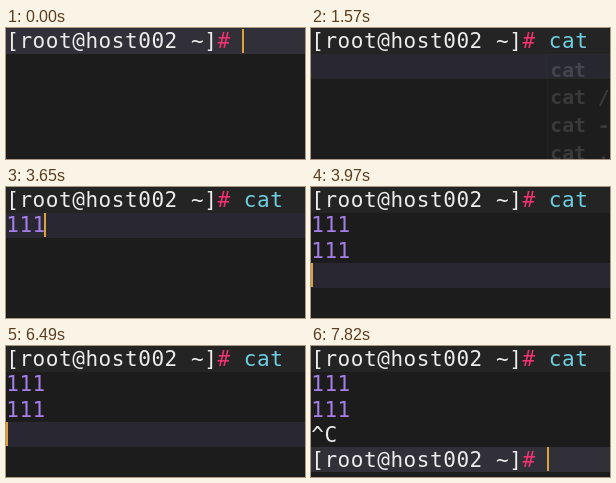
Write an HTML page that moves like this. It is 299 px wide and 131 px high and loops after 8300 ms.

```html
<!DOCTYPE html>
<html lang="en">
<head>
<meta charset="utf-8">
<title>Terminal</title>
<style>
html, body { margin: 0; width: 100%; height: 100%; overflow: hidden; background: #1c1c1c; }
svg { display: block; width: 299px; height: 131px; }
text { font: 21px "DejaVu Sans Mono", monospace; letter-spacing: 0.557px; white-space: pre; fill: #ececec; }
.hash { fill: #f0326e; }
.cmd { fill: #6fcfe2; }
.num { fill: #a57ee8; }
.shade { fill: #fff; fill-opacity: 0.035; }
#popup text { font-size: 19.7px; font-weight: bold; letter-spacing: 0; fill: #b4b4b4; }
</style>
</head>
<body>
<svg viewBox="0 0 299 131" xmlns="http://www.w3.org/2000/svg">
  <rect width="299" height="131" fill="#1c1c1c"/>
  <rect id="active" width="299" fill="#292832"/>
  <rect class="shade" width="299" height="26"/>
  <rect class="shade" id="lastPrompt" y="101" width="299" height="25"/>
  <g id="lines"></g>
  <rect id="cursor" width="2" height="24" fill="#dca23c"/>
  <g id="popup">
    <rect x="236" y="26" width="63" height="105" fill="#242424"/>
    <path d="M299 26.5H236.5V131" fill="none" stroke="#3a3a3c"/>
  </g>
</svg>
<script>
const LOOP = 8300, CHAR = 13.2, ROW = 25;
const $ = id => document.getElementById(id);
const rowTop = r => r ? 1 + r * ROW : 0;
const baseline = r => 20.3 + r * 25.1;

function addText(parent, x, y) {
  const el = document.createElementNS("http://www.w3.org/2000/svg", "text");
  el.setAttribute("x", x);
  el.setAttribute("y", y);
  parent.append(el);
  return el;
}

const lines = [0, 1, 2, 3, 4].map(r => addText($("lines"), 0.2, baseline(r)));
["cat", "cat /", "cat -", "cat ."].forEach((s, i) => {
  addText($("popup"), 239.3, 48.7 + i * 27.6).textContent = s;
});

const prompt = '[root@host002 ~]<tspan class="hash">#</tspan> ';
const span = (cls, s) => `<tspan class="${cls}">${s}</tspan>`;

// Value of the last [time, value] step that has been reached
const step = (t, steps) => steps.reduce((v, [at, next]) => t >= at ? next : v, steps[0][1]);

const command = [[0, ""], [560, "c"], [720, "ca"], [860, "cat"]];
const input = [[0, ""], [3010, "1"], [3170, "11"], [3410, "111"]];
const activeRow = [[0, 0], [1490, 1], [3970, 3], [6800, 4]];
const popupAlpha = [[0, 0], [640, 0.5], [720, 1], [1490, 0.5], [1570, 0.2], [1650, 0]];
const toggles = [320, 560, 1490, 2130, 3410, 3650, 4290, 4930, 5880, 6490, 7190, 7820];

function draw(t) {
  const cmd = step(t, command), typed = step(t, input), row = step(t, activeRow);
  const content = [
    prompt + span("cmd", cmd),
    span("num", typed),
    row >= 3 ? span("num", typed) : "",
    row === 4 ? "^C" : "",
    row === 4 ? prompt : ""
  ];
  lines.forEach((el, i) => {
    if (el.markup !== content[i]) el.innerHTML = el.markup = content[i];
  });

  const top = rowTop(row);
  $("active").setAttribute("y", top);
  $("active").setAttribute("height", rowTop(row + 1) - top);
  $("lastPrompt").setAttribute("opacity", row === 4 ? 1 : 0);

  const column = [18 + cmd.length, typed.length, 0, 0, 18][row];
  const visible = toggles.filter(at => t >= at).length % 2 === 0;
  $("cursor").setAttribute("x", Math.max(0, Math.floor(column * CHAR) - 1));
  $("cursor").setAttribute("y", 1 + row * ROW);
  $("cursor").setAttribute("opacity", visible ? 1 : 0);
  $("popup").setAttribute("opacity", step(t, popupAlpha));
}

const start = performance.now();
function tick() {
  draw((performance.now() - start) % LOOP);
  requestAnimationFrame(tick);
}
tick();
</script>
</body>
</html>
```
